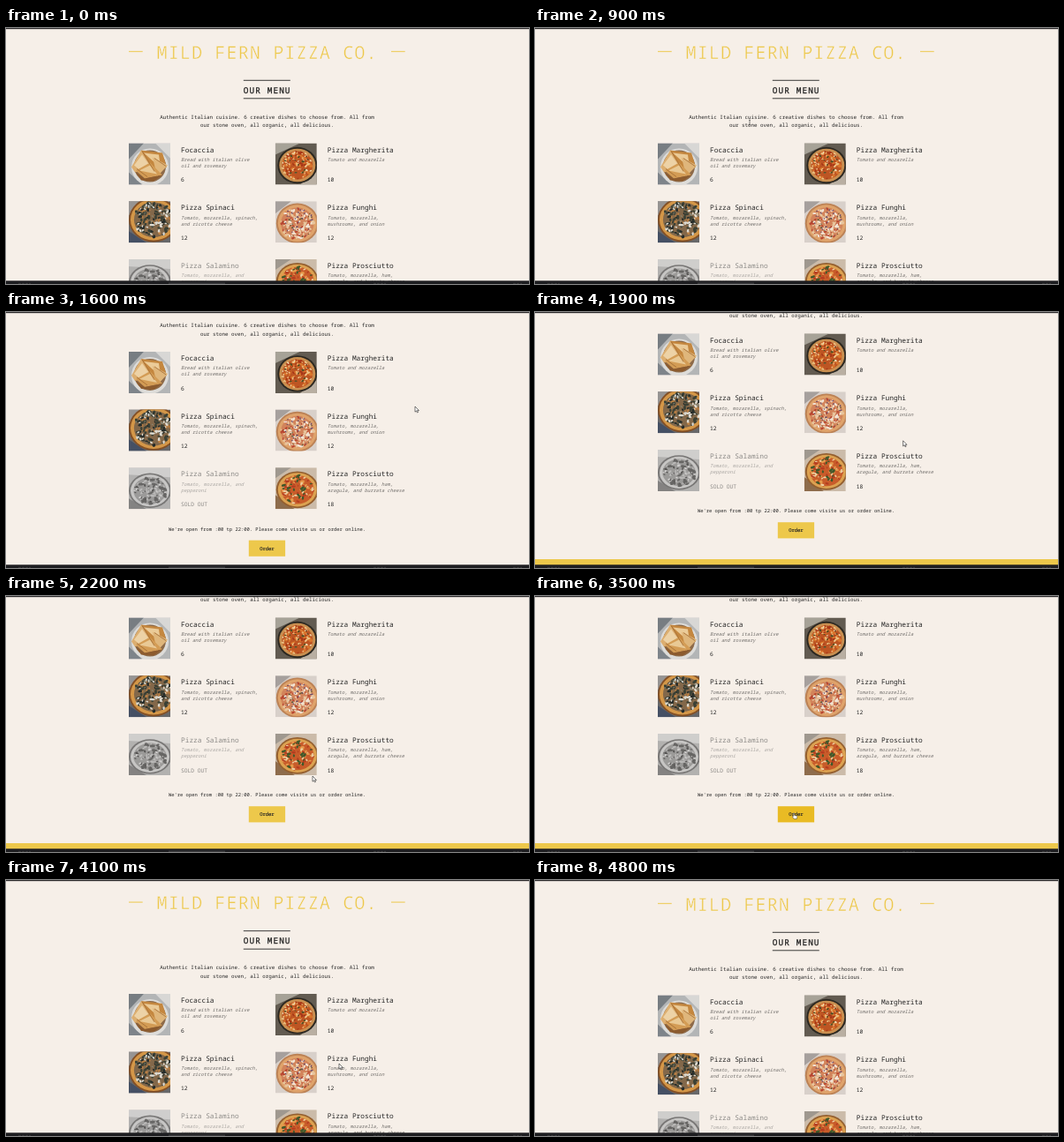
An HTML page for the animation above (6500 ms loop, 592 px wide and 290 px high).

```html
<!DOCTYPE html>
<html lang="en">
<head>
<meta charset="utf-8">
<style>
  html, body { margin: 0; width: 100%; height: 100%; overflow: hidden; background: #f6efe8; }
  svg { display: block; }
  text {
    font-family: "Noto Sans Mono", "Liberation Mono", monospace;
    fill: #252525; text-rendering: geometricPrecision; white-space: pre;
  }
  .middle { text-anchor: middle; }
  /* The background-coloured outline thins the strokes to a light weight. */
  .title { font-size: 20.3px; font-weight: 300; letter-spacing: 1px; fill: #edc84b; stroke: #f6efe8; stroke-width: .45px; }
  .menu { font-size: 9.38px; font-weight: 500; letter-spacing: 1.1px; stroke: #252525; stroke-width: .3px; }
  .intro { font-size: 5.87px; }
  .name { font-size: 7.82px; }
  .detail { font-size: 5.39px; font-weight: 300; font-style: italic; fill: #716e6b; }
  .price { font-size: 6.26px; }
  .small { font-size: 5.47px; }
  .order { font-size: 5.47px; font-weight: 500; stroke: #252525; stroke-width: .15px; }
  .sold text { fill: #8b8986; }
  .sold .detail { fill: #aaa7a3; }
  .sold .photo { filter: grayscale(1); opacity: .8; }
</style>
</head>
<body>
<svg width="592" height="290" viewBox="0 0 592 290">
  <defs><clipPath id="square"><rect width="47" height="47"/></clipPath></defs>
  <rect width="592" height="290" fill="#f6efe8"/>
  <g id="page">
    <path d="M139 26.7h15.7M436 26.7h15.7" stroke="#edc84b"/>
    <text class="title middle" x="295.6" y="35">MILD FERN PIZZA CO.</text>
    <path d="M268.8 59.3h53M268.8 79.8h53" stroke="#252525" stroke-width=".9"/>
    <text class="menu middle" x="295.7" y="73.7">OUR MENU</text>
    <text class="intro middle" x="295.5" y="103">Authentic Italian cuisine. 6 creative dishes to choose from. All from</text>
    <text class="intro middle" x="295.5" y="112.2">our stone oven, all organic, all delicious.</text>
    <g id="dishes"></g>
    <text class="small middle" x="295.5" y="333.4">We're open from :00 tp 22:00. Please come visite us or order online.</text>
    <rect id="button" x="274.8" y="344.2" width="41.3" height="18.2"/>
    <text class="order middle" x="295.4" y="355.3">Order</text>
    <rect y="386" width="592" height="8" fill="#edc84b"/>
  </g>
  <rect width="592" height="1.2" fill="#2b2a2b"/>
  <rect y="286.3" width="592" height="4" fill="#1d1d20"/>
  <path d="M184 289.2h64" stroke="#47474a"/>
  <path d="M14 289.4h14M416 289.4h14M574 289.4h10" stroke="#38383b" stroke-dasharray="3 1"/>
  <g id="cursor">
    <path id="arrow" d="M0 0V6.2L1.5 4.9L2.5 7L3.5 6.5L2.6 4.5H4.4Z" fill="#fff" stroke="#222" stroke-width=".6"/>
    <path id="beam" d="M-1 -2.7H1M0 -2.7V2.7M-1 2.7H1" fill="none" stroke="#333" stroke-width=".6"/>
    <path id="hand" d="M-.6 0Q0 -.7 .6 0V2.4L3.2 3Q4 3.3 3.8 4.4L3.2 6.6H.2L-1.7 4Q-1.6 3 -.6 3.7Z" fill="#fff" stroke="#333" stroke-width=".5"/>
  </g>
</svg>
<script>
const byId = id => document.getElementById(id);
const LOOP = 6500, STEP = 100;

function seeded(seed) {
  return () => (seed = (seed * 16807) % 2147483647) / 2147483647;
}

const circle = (x, y, r, fill) => `<circle cx="${x}" cy="${y}" r="${r}" fill="${fill}"/>`;
const shape = (d, fill) => `<path d="${d}" fill="${fill}"/>`;
const ground = color => shape("M0 0H47V47H0Z", color);

// A disc squashed to the given height ratio; toppings are [colour, count, size].
function pizza(seed, backdrop, [x, y, r, squash], [rim, crust, sauce], toppings) {
  const random = seeded(seed);
  let disc = circle(0, 0, r + 2, rim) + circle(0, 0, r, crust) + circle(0, 0, r * .85, sauce);
  for (const [color, count, size] of toppings) {
    for (let i = 0; i < count; i++) {
      const angle = random() * 6.283, far = Math.sqrt(random()) * r * .84;
      const px = Math.cos(angle) * far, py = Math.sin(angle) * far;
      const rx = size * (.6 + random() * .8);
      disc += `<ellipse cx="${px}" cy="${py}" rx="${rx}" ry="${rx * .55}" fill="${color}" transform="rotate(${random() * 180} ${px} ${py})"/>`;
    }
  }
  return `${backdrop}<g transform="translate(${x} ${y}) scale(1 ${squash})">${disc}</g>`;
}

const focaccia = ground("#b3b5b6")
  + shape("M0 0H17L0 18Z", "#777d82") + shape("M30 0H47V17Z", "#d8d7d5") + shape("M0 33L15 47H0Z", "#7e848a")
  + circle(24, 27, 21, "#dddcd9") + circle(24, 26, 18, "#8d6a49")
  + shape("M3 27L14 8L27 18L24 30L7 33Z", "#dcae70") + shape("M14 8L38 11L43 27L30 34Z", "#c4873f")
  + shape("M17 11L34 13L36 28Z", "#ebcb98") + shape("M27 16L44 25L32 38Z", "#dfb67b")
  + shape("M6 25L15 13L27 30L19 36Z", "#edd2a6") + shape("M8 31L24 22L38 36L18 40Z", "#d39c55")
  + shape("M12 31L24 25L32 35Z", "#e9c995") + shape("M7 32L18 40L38 36L28 43L14 42Z", "#8c5b2e")
  + `<path d="M15 9L29 32M9 29L21 38M29 17L42 26" stroke="#a16a33" stroke-width=".8"/>`;

const margherita = pizza(11,
  ground("#625b51") + shape("M0 0H28L0 13Z", "#a6a297") + shape("M47 32V47H28Z", "#b9afa2"),
  [25, 25, 20.5, .92], ["#2c2821", "#c98f50", "#bd5523"],
  [["#da762d", 45, 2], ["#edc384", 40, 1.5], ["#a63517", 28, 1.5], ["#f3dfb7", 18, 1.2], ["#4a4c24", 14, 1.4]]);

const spinaci = pizza(23,
  ground("#68686a") + shape("M0 0H30L0 16Z", "#969493") + shape("M0 34L20 47H0Z", "#455064"),
  [28, 21, 26, .9], ["#835026", "#d49748", "#83684a"],
  [["#bd8144", 25, 2], ["#3a4035", 55, 2.3], ["#242b2a", 32, 1.8], ["#dedbd2", 36, 1.8], ["#8c8d7e", 15, 1.5]]);

const funghi = pizza(37,
  ground("#d8d0ca") + shape("M0 0H18L0 14Z", "#a6a09d"),
  [25, 25, 22, .95], ["#bc8255", "#dfa36b", "#d2845b"],
  [["#e8c59d", 50, 2], ["#b84530", 34, 1.5], ["#f2e4d5", 42, 1.7], ["#6b4a68", 25, 1.1], ["#665936", 16, 1.1]]);

const salamino = pizza(41,
  ground("#a2a2a2") + shape("M0 0H47V11L0 8Z", "#c6c6c6") + shape("M0 35L20 47H0Z", "#686868"),
  [24, 26, 22, .82], ["#595959", "#bcbcbc", "#858585"],
  [["#adadad", 40, 2], ["#444", 32, 2.4], ["#303030", 18, 1.4], ["#d0d0d0", 18, 1.2]]);

const prosciutto = pizza(59,
  ground("#cbbba9") + shape("M0 31L22 47H0Z", "#8e6c4c") + shape("M0 0H18L0 12Z", "#9f988f"),
  [25, 25, 22, .87], ["#945f2f", "#dca251", "#c85c2a"],
  [["#e59a4c", 36, 2], ["#b43b20", 28, 1.8], ["#edcfa0", 24, 1.6], ["#3f592a", 22, 2]]);

const dishes = [
  ["Focaccia", "Bread with italian olive", "oil and rosemary", "6", focaccia],
  ["Pizza Margherita", "Tomato and mozarella", "", "10", margherita],
  ["Pizza Spinaci", "Tomato, mozarella, spinach,", "and ricotta cheese", "12", spinaci],
  ["Pizza Funghi", "Tomato, mozarella,", "mushrooms, and onion", "12", funghi],
  ["Pizza Salamino", "Tomato, mozarella, and", "pepperoni", "SOLD OUT", salamino],
  ["Pizza Prosciutto", "Tomato, mozarella, ham,", "aragula, and burrata cheese", "18", prosciutto],
];

byId("dishes").innerHTML = dishes.map(([name, line1, line2, price, art], i) => `
  <g transform="translate(${139 + (i % 2) * 165.8} ${130.5 + (i >> 1) * 65.7})" class="${price === "SOLD OUT" ? "sold" : ""}">
    <g class="photo" clip-path="url(#square)">${art}</g>
    <text class="name" x="59" y="10">${name}</text>
    <text class="detail" x="59" y="20.6">${line1}</text>
    <text class="detail" x="59" y="27.6">${line2}</text>
    <text class="price" x="59" y="43.9">${price}</text>
  </g>`).join("");

// Keys are [time, ...values], joined by straight lines.
function along(keys, time) {
  const next = keys.findIndex(key => key[0] > time);
  if (next < 0) return keys[keys.length - 1].slice(1);
  if (next === 0) return keys[0].slice(1);
  const a = keys[next - 1], b = keys[next], k = (time - a[0]) / (b[0] - a[0]);
  return a.slice(1).map((value, i) => value + (b[i + 1] - value) * k);
}

const scrollKeys = [
  [1400, 0], [1500, 42], [1600, 85.6], [1700, 100], [1800, 104.5], [1900, 106],
  [3600, 106], [3700, 88], [3800, 52], [3900, 21], [4000, 7], [4100, 1.6], [4200, 0],
];
const cursorKeys = [
  [100, 537, 280], [400, 395, 165], [700, 242, 112], [900, 243, 107], [1150, 350, 140],
  [1400, 463, 107], [1700, 463, 107], [2200, 347, 204], [2500, 310, 240], [2800, 293, 246],
  [3500, 293, 246], [3800, 350, 225], [4100, 377, 208], [4400, 440, 235], [4700, 538, 284],
];

function draw(time) {
  const [scroll] = along(scrollKeys, time);
  const [x, y] = along(cursorKeys, time);
  const hover = x > 274.8 && x < 316.1 && y + scroll > 344.2 && y + scroll < 362.4;
  const kind = hover ? "hand" : time >= 700 && time <= 1000 ? "beam" : "arrow";

  byId("page").setAttribute("transform", `translate(0 ${-scroll})`);
  byId("button").setAttribute("fill", hover ? "#e9bb24" : "#edc84b");
  byId("cursor").setAttribute("transform", `translate(${x} ${y})`);
  byId("cursor").setAttribute("visibility", time >= 100 && time < 4800 ? "visible" : "hidden");
  for (const id of ["arrow", "beam", "hand"]) byId(id).style.display = id === kind ? "" : "none";
}

const start = performance.now();
function tick() {
  const time = (performance.now() - start) % LOOP;
  draw(Math.floor(time / STEP) * STEP);
  requestAnimationFrame(tick);
}
tick();
</script>
</body>
</html>
```
